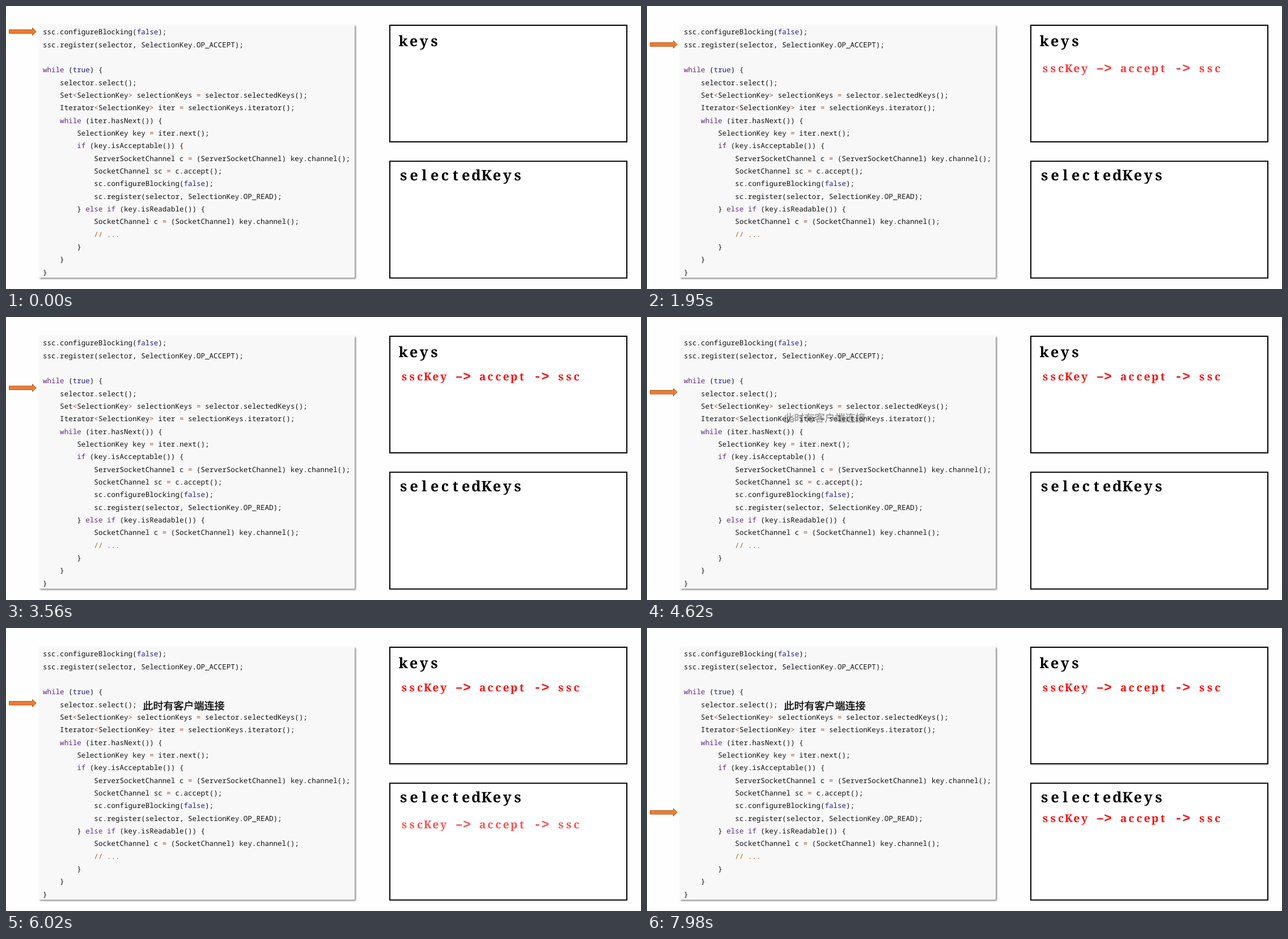
An HTML page that plays this animation: 1120x500 px, repeating every 8000 ms.

```html
<!DOCTYPE html>
<html lang="zh">
<head>
<meta charset="utf-8">
<title>Selector loop</title>
<style>
  html, body { margin: 0; width: 100%; height: 100%; overflow: hidden; background: #fefefe; }
  svg { display: block; width: 1120px; height: 500px; }
  text { white-space: pre; text-rendering: geometricPrecision; }
  .code { font: 12.55px "Roboto Mono", "Noto Sans Mono", "DejaVu Sans Mono", monospace; fill: #111; }
  .word { fill: #642a86; }
  .atom { fill: #221f88; }
  .op { fill: #a0502a; }
  .note { fill: #aa5a1a; }
  .slab { font-family: "Noto Serif", serif; font-weight: bold; text-anchor: middle; font-variant-ligatures: none; }
  .title { font-size: 25.5px; }
  .key { font-size: 19.3px; fill: #fa0f0f; }
  .sign { font-family: "Liberation Mono", monospace; font-size: 23px; }
  .hint { font: 18px "Noto Sans CJK SC", "Noto Sans CJK", sans-serif; fill: #111; stroke: #111; stroke-width: .5; }
  .box { fill: #fff; stroke: #000; stroke-width: 2; }
</style>
</head>
<body>
<svg viewBox="0 0 1120 500" xmlns="http://www.w3.org/2000/svg">
  <defs>
    <filter id="shade" x="-5%" y="-5%" width="110%" height="110%">
      <feDropShadow dx="2" dy="2" stdDeviation="1.6" flood-color="#000" flood-opacity=".45"/>
    </filter>
  </defs>
  <rect width="1120" height="500" fill="#fefefe"/>
  <rect x="58" y="33" width="557" height="447" fill="#f8f8f8" filter="url(#shade)"/>
  <g id="code"></g>
  <rect class="box" x="677" y="34" width="418" height="206"/>
  <rect class="box" x="677" y="274.3" width="418" height="206.3"/>
  <g id="labels"></g>
  <text class="hint" id="hint" x="241.5" y="143.5">此时有客户端连接</text>
  <path id="arrow" d="M5.5 -3.3H46.5V-6.8L53.3 0L46.5 6.8V3.3H5.5Z" fill="#ed7d31" stroke="#ae5a21"/>
</svg>
<script>
const LOOP = 8000, RISE = 63, RISE_TIME = 1206;
const $ = id => document.getElementById(id);

const source = `ssc.configureBlocking(false);
ssc.register(selector, SelectionKey.OP_ACCEPT);

while (true) {
    selector.select();
    Set<SelectionKey> selectionKeys = selector.selectedKeys();
    Iterator<SelectionKey> iter = selectionKeys.iterator();
    while (iter.hasNext()) {
        SelectionKey key = iter.next();
        if (key.isAcceptable()) {
            ServerSocketChannel c = (ServerSocketChannel) key.channel();
            SocketChannel sc = c.accept();
            sc.configureBlocking(false);
            sc.register(selector, SelectionKey.OP_READ);
        } else if (key.isReadable()) {
            SocketChannel c = (SocketChannel) key.channel();
            // ...
        }
    }
}`;

function add(parent, tag, attrs, text) {
  const el = document.createElementNS("http://www.w3.org/2000/svg", tag);
  for (const name in attrs) el.setAttribute(name, attrs[name]);
  if (text) el.textContent = text;
  return parent.appendChild(el);
}

function tokenClass(token) {
  if (token.startsWith("//")) return "note";
  if (/^(while|if|else)$/.test(token)) return "word";
  if (/^(true|false)$/.test(token)) return "atom";
  return /^[<>=]$/.test(token) ? "op" : "";
}

source.split("\n").forEach((line, row) => {
  const indent = line.search(/\S|$/);
  const text = add($("code"), "text", { class: "code", x: 65 + indent * 7.53, y: 50.3 + row * 22.33 });
  for (const token of line.trim().split(/(\/\/.*|\b(?:while|if|else|true|false)\b|[<>=])/))
    if (token) add(text, "tspan", { class: tokenClass(token) }, token);
});

// Typewriter setting: every letter is centred in a cell of equal width.
function label(id, kind, str, x, y, cell) {
  const xs = [...str].map((_, i) => (x + (i + 0.5) * cell).toFixed(2)).join(" ");
  const text = add($("labels"), "text", { id, class: "slab " + kind, x: xs, y });
  for (const part of str.split(/([-–>]+)/))
    if (part) add(text, "tspan", { class: /[->]/.test(part) ? "sign" : "" }, part);
}

const entry = "sscKey –> accept -> ssc";
label("keysTitle", "title", "keys", 691.5, 70.5, 18.3);
label("pickedTitle", "title", "selectedKeys", 692, 307.5, 18.3);
label("key", "key", entry, 695.5, 111.5, 13.82);
label("picked", "key", entry, 695.5, 342.5, 13.82);

const progress = (t, start, time) => Math.min(1, Math.max(0, (t - start) / time));
const ease = p => p * p * (3 - 2 * p);

// start, duration, distance
const moves = [[0, 960, 22.8], [2263, 1650, 64.8], [6490, 1710, 202]];
const floats = [["key", 960], ["hint", 4148], ["picked", 5150]];

function draw(t) {
  const y = moves.reduce((sum, [start, time, dist]) => sum + dist * ease(progress(t, start, time)), 45.2);
  $("arrow").setAttribute("transform", `translate(0 ${y})`);
  for (const [id, start] of floats) {
    const p = progress(t, start, RISE_TIME);
    $(id).setAttribute("transform", `translate(0 ${RISE * (1 - ease(p))})`);
    $(id).setAttribute("opacity", p);
  }
}

const begin = performance.now();
function tick() {
  draw((performance.now() - begin) % LOOP);
  requestAnimationFrame(tick);
}
draw(0);
requestAnimationFrame(tick);
</script>
</body>
</html>
```
